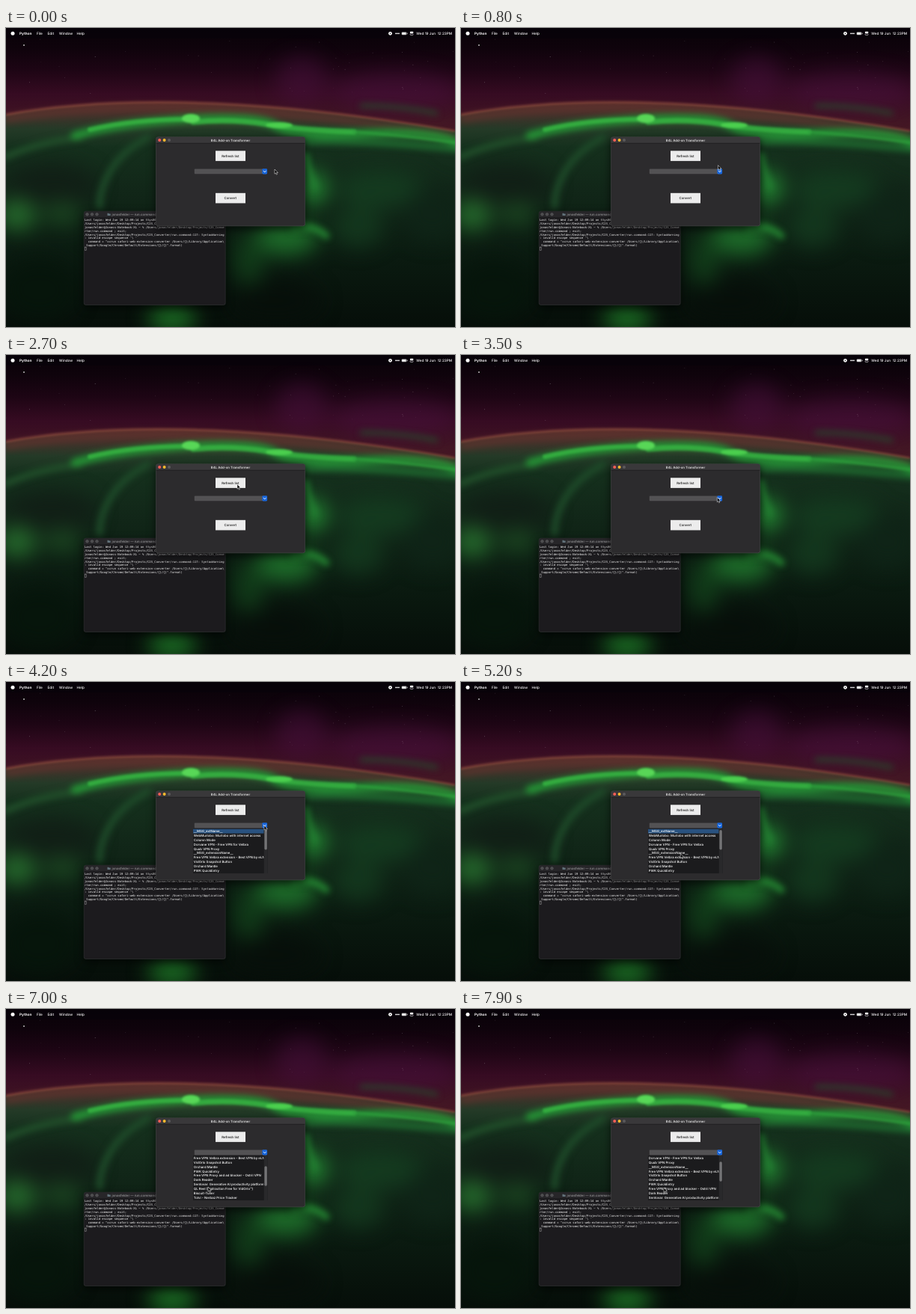
Recreate the animation shown at these times as an HTML page. Size 600 px wide and 400 px high, loop 8000 ms.

```html
<!DOCTYPE html>
<html lang="en">
<head>
<meta charset="utf-8">
<title>Extension list</title>
<style>
html, body { margin: 0; width: 100%; height: 100%; overflow: hidden; background: #000; }
svg { display: block; }
filter { color-interpolation-filters: sRGB; }
text { font-family: Inter, Roboto, sans-serif; white-space: pre; text-rendering: geometricPrecision; }
.menu { font-size: 4.7px; font-weight: 500; fill: #fff; }
.ui { font-size: 4.35px; font-weight: 500; }
.mono { fill: #f6f6f6; }
.mono text { font: 3.88px "DejaVu Sans Mono", monospace; }
</style>
</head>
<body>
<svg id="stage" width="600" height="400" viewBox="0 0 600 400">
  <defs>
    <linearGradient id="sky" x2="0" y2="1">
      <stop offset="0" stop-color="#080207"/>
      <stop offset=".07" stop-color="#0f030c"/>
      <stop offset=".14" stop-color="#1d0514"/>
      <stop offset=".22" stop-color="#360b22"/>
      <stop offset=".32" stop-color="#431724"/>
    </linearGradient>
    <linearGradient id="land" x2="0" y2="1">
      <stop offset="0" stop-color="#572b2a"/>
      <stop offset=".06" stop-color="#40322a"/>
      <stop offset=".12" stop-color="#243a27"/>
      <stop offset=".2" stop-color="#15301d"/>
      <stop offset=".4" stop-color="#112618"/>
      <stop offset=".65" stop-color="#0b1c11"/>
      <stop offset="1" stop-color="#060e09"/>
    </linearGradient>
    <filter id="b1" x="-20%" y="-60%" width="140%" height="220%"><feGaussianBlur stdDeviation="1.6"/></filter>
    <filter id="b5" x="-50%" y="-80%" width="200%" height="260%"><feGaussianBlur stdDeviation="4"/></filter>
    <filter id="b16" x="-80%" y="-80%" width="260%" height="260%"><feGaussianBlur stdDeviation="14"/></filter>
    <filter id="shade" x="-20%" y="-20%" width="140%" height="150%">
      <feDropShadow dx="0" dy="4" stdDeviation="6" flood-color="#000" flood-opacity=".65"/>
    </filter>
  </defs>

  <!-- Wallpaper -->
  <rect width="600" height="400" fill="url(#sky)"/>
  <g id="stars" fill="#fff"/>
  <g filter="url(#b16)" fill="#4b123f" opacity=".5">
    <ellipse cx="395" cy="70" rx="35" ry="32"/>
    <ellipse cx="520" cy="85" rx="85" ry="26"/>
  </g>
  <path d="M0 116Q230 74 600 138V400H0Z" fill="url(#land)"/>
  <g fill="none">
    <path d="M0 122Q230 82 600 146" stroke="#63342f" stroke-width="11" opacity=".6" filter="url(#b5)"/>
    <path d="M0 116Q230 74 600 138" stroke="#82453a" stroke-width="2.5" filter="url(#b1)"/>
  </g>
  <g filter="url(#b16)">
    <ellipse cx="60" cy="210" rx="60" ry="28" fill="#111f16"/>
    <ellipse cx="15" cy="250" rx="25" ry="20" fill="#266c2d"/>
    <ellipse cx="75" cy="248" rx="25" ry="14" fill="#1c4922"/>
    <ellipse cx="410" cy="214" rx="18" ry="22" fill="#258f35"/>
    <ellipse cx="500" cy="215" rx="60" ry="25" fill="#143a1f"/>
    <ellipse cx="375" cy="280" rx="42" ry="24" fill="#1d6a29"/>
    <ellipse cx="325" cy="310" rx="20" ry="35" fill="#113b19"/>
    <ellipse cx="470" cy="265" rx="35" ry="28" fill="#13361d"/>
    <ellipse cx="570" cy="250" rx="40" ry="35" fill="#0f2417"/>
    <ellipse cx="45" cy="350" rx="50" ry="40" fill="#06150b"/>
    <ellipse cx="222" cy="388" rx="32" ry="20" fill="#1a6722"/>
    <ellipse cx="360" cy="365" rx="60" ry="25" fill="#070f0a"/>
  </g>
  <g filter="url(#b5)" fill="none" stroke-linecap="round">
    <path d="M0 172Q45 152 100 146" stroke="#22512b" stroke-width="8"/>
    <path d="M92 144Q150 127 245 122T360 131T480 141T610 157" stroke="#259235" stroke-width="11"/>
    <path d="M400 152Q480 150 605 162" stroke="#207532" stroke-width="7"/>
    <path d="M190 146Q155 165 140 190T125 238" stroke="#1e4a29" stroke-width="9"/>
    <path d="M400 170Q405 195 412 212" stroke="#237f32" stroke-width="9"/>
    <path d="M385 268Q410 262 428 278" stroke="#238030" stroke-width="9"/>
    <path d="M475 104Q520 103 575 114" stroke="#28452b" stroke-width="5"/>
  </g>
  <g filter="url(#b1)" fill="none" stroke-linecap="round">
    <path d="M112 136Q170 122 245 122" stroke="#39bd45" stroke-width="6" opacity=".75"/>
    <path d="M250 126Q300 121 350 129T465 139" stroke="#39bd45" stroke-width="7" opacity=".75"/>
    <path d="M465 139Q530 143 605 154" stroke="#2ea03c" stroke-width="4" opacity=".7"/>
    <ellipse cx="247" cy="121" rx="12" ry="6" fill="#58d757"/>
    <ellipse cx="365" cy="130" rx="18" ry="4" fill="#4bcf4e"/>
  </g>

  <!-- Menu bar -->
  <rect width="600" height="14" fill="#07030a" opacity=".5"/>
  <circle cx="9" cy="7.2" r="2.5" fill="#fff"/>
  <g class="menu">
    <text x="18" y="9" font-weight="700">Python</text>
    <text x="41" y="9">File</text>
    <text x="55.5" y="9">Edit</text>
    <text x="71" y="9">Window</text>
    <text x="94.5" y="9">Help</text>
    <text x="596" y="9" text-anchor="end">Wed 19 Jun  12:23PM</text>
  </g>
  <g fill="#fff">
    <circle cx="513.5" cy="7.3" r="2.4"/>
    <circle cx="513.5" cy="7.3" r=".8" fill="#222"/>
    <circle cx="521" cy="7.3" r=".9"/><circle cx="523" cy="7.3" r=".9"/><circle cx="525" cy="7.3" r=".9"/>
    <rect x="528.7" y="5.6" width="6.6" height="3.6" rx="1" fill="#bbb"/>
    <rect x="529.5" y="6.3" width="4" height="2.2"/>
    <rect x="535.8" y="6.6" width=".7" height="1.6"/>
    <rect x="539.8" y="4.8" width="4.6" height="2.1" rx="1"/>
    <rect x="540" y="7.6" width="4.2" height="1.9" rx=".9" fill="none" stroke="#fff" stroke-width=".5"/>
  </g>

  <!-- Terminal -->
  <g filter="url(#shade)">
    <rect x="104.2" y="245.2" width="189" height="125.3" rx="2.5" fill="#1c1b1e" stroke="#3c3c3e" stroke-width=".5"/>
    <path d="M104.5 253V248a2.5 2.5 0 0 1 2.5-2.5H290.4a2.5 2.5 0 0 1 2.5 2.5V253Z" fill="#272629"/>
  </g>
  <g fill="#4b4b4d" stroke="#727274" stroke-width=".4">
    <circle cx="108.5" cy="249.3" r="1.8"/><circle cx="115" cy="249.3" r="1.8"/><circle cx="121.5" cy="249.3" r="1.8"/>
  </g>
  <path d="M135.5 247.8h1.6l.6.6h2v2.7h-4.2Z" fill="#62727b"/>
  <text x="141.5" y="250.8" class="ui" style="font-weight:600" fill="#8b8b8d">jonasfelder — run.command</text>
  <g id="shell" class="mono"/>
  <rect x="105.3" y="293.4" width="2" height="4" fill="none" stroke="#999" stroke-width=".5"/>

  <!-- Converter window -->
  <g filter="url(#shade)">
    <rect x="200.3" y="145.8" width="199.4" height="119" rx="3" fill="#2c2b2d" stroke="#4c4c4e" stroke-width=".6"/>
  </g>
  <path d="M200.6 154V149a3 3 0 0 1 3-3H396.4a3 3 0 0 1 3 3V154Z" fill="#39383a"/>
  <path d="M200.5 154.2H399.5" stroke="#171719" stroke-width=".6"/>
  <circle cx="205.2" cy="150" r="2" fill="#fe5f57"/>
  <circle cx="211.6" cy="150" r="2" fill="#febc2e"/>
  <circle cx="218" cy="150" r="2" fill="#5b5a5c"/>
  <text x="300" y="151.6" class="ui" style="font-weight:600" text-anchor="middle" fill="#dedede">B4L Add-on Transformer</text>
  <g fill="#ececec">
    <rect x="280" y="164.3" width="40" height="13.6"/>
    <rect x="280" y="220.8" width="40" height="13.6"/>
  </g>
  <g class="ui" text-anchor="middle" fill="#111">
    <text x="299.8" y="172.7">Refresh list</text>
    <text x="299.8" y="229.2">Convert</text>
  </g>
  <rect x="251.8" y="188.4" width="97" height="6.8" rx="1" fill="#535254"/>
  <rect x="342.4" y="188.2" width="6.7" height="7.2" rx="1.4" fill="#1766dc"/>
  <path d="M343.9 191.1l1.9 1.6 1.9-1.6" fill="none" stroke="#fff" stroke-width=".9"/>

  <!-- Drop-down -->
  <g id="drop">
    <rect x="250" y="196" width="99.5" height="60" fill="#1b1b1d"/>
    <svg x="250" y="196" width="94.6" height="60"><g id="rows" class="ui" fill="#fff"/></svg>
    <rect x="344.8" y="196" width="4.7" height="60" fill="#29292b"/>
    <rect id="thumb" x="345.4" width="3.4" y="198" height="26.5" rx="1.7" fill="#737375"/>
  </g>

  <path id="cursor" d="M0 0V6.2L1.4 4.9 2.4 7.1 3.4 6.7 2.5 4.5H4.4Z" fill="#000" stroke="#fff" stroke-width=".5"/>
</svg>
<script>
const $ = id => document.getElementById(id);

function add(parent, tag, attrs, label = "") {
  const el = document.createElementNS("http://www.w3.org/2000/svg", tag);
  for (const key in attrs) el.setAttribute(key, attrs[key]);
  el.textContent = label;
  parent.append(el);
}

const shell = [
  "Last login: Wed Jun 19 12:09:14 on ttys000",
  "/Users/jonasfelder/Desktop/Projects/C2S_Converter/run.command ; exit;",
  "jonasfelder@Jonass-Notebook-XL ~ % /Users/jonasfelder/Desktop/Projects/C2S_Conve",
  "rter/run.command ; exit;",
  "/Users/jonasfelder/Desktop/Projects/C2S_Converter/run.command:117: SyntaxWarning",
  ": invalid escape sequence '\\ '",
  "  command = \"xcrun safari-web-extension-converter /Users/{}/Library/Application\\",
  "_Support/Google/Chrome/Default/Extensions/{}/{}\".format("
];
shell.forEach((line, i) => add($("shell"), "text", { x: 105, y: 258.4 + i * 4.78 }, line));

const ROW = 5.85;
const items = [
  "__MSG_extName__",
  "WebMurlobo: Murlobo with internet access",
  "Column Mode",
  "Dorvane VPN - Free VPN for Velbra",
  "Quub VPN Proxy",
  "__MSG_extensionName__",
  "Free VPN Velbra extension - Best VPN by eLNT",
  "VidOrlo Snapshot Button",
  "Orchard Mantle",
  "PWK QuickEntry",
  "Free VPN Proxy and ad blocker - Ostril VPN",
  "Dark Reader",
  "Sentovar: Generative AI productivity platform",
  "QL Reel (Distraction Free for VidOrlo™)",
  "Biscuit-Tuner",
  "Tolvi - Nerbaz Price Tracker"
];
add($("rows"), "rect", { y: .7, width: 95, height: ROW, fill: "#29527f" });
items.forEach((item, i) => add($("rows"), "text", { x: .8, y: 5.1 + i * ROW }, item));

// Seeded stars
let seed = 7;
const rand = () => (seed = seed * 16807 % 2147483647) / 2147483647;
for (let i = 0; i < 45; i++)
  add($("stars"), "circle", { cx: rand() * 600, cy: 15 + rand() * 75, r: .25 + rand() * .25, opacity: .2 + rand() * .35 });
add($("stars"), "circle", { cx: 24, cy: 23, r: .9, opacity: .8 });

// Keys hold [time, value, ...]
const path = [
  [0, 359, 189], [500, 359, 189], [1300, 310, 172], [1800, 310, 172], [2600, 309, 173],
  [3000, 309, 173], [3600, 345, 192], [4500, 345, 192], [5500, 279, 240],
  [6200, 279, 240], [7000, 270, 238], [7900, 271, 239]
];
const scroll = [[0, 0], [6200, 0], [7000, 6], [7200, 6], [7900, 3]];

function at(keys, t, ease = u => u) {
  const i = keys.findIndex(k => k[0] > t);
  if (i < 0) return keys.at(-1).slice(1);
  const a = keys[i - 1], b = keys[i];
  const u = ease((t - a[0]) / (b[0] - a[0]));
  return a.slice(1).map((v, n) => v + (b[n + 1] - v) * u);
}
const smooth = u => u * u * (3 - 2 * u);

function draw(now) {
  const t = Math.floor(now % 8000 / 100) * 100;
  const [x, y] = at(path, t, smooth);
  const top = Math.round(at(scroll, t)[0]);
  $("cursor").setAttribute("transform", `translate(${x} ${y})`);
  $("drop").style.display = t < 3800 ? "none" : "";
  $("rows").setAttribute("transform", `translate(0 ${-top * ROW})`);
  $("thumb").setAttribute("y", 198 + top * 2.05);
  requestAnimationFrame(draw);
}
draw(performance.now());
</script>
</body>
</html>
```
